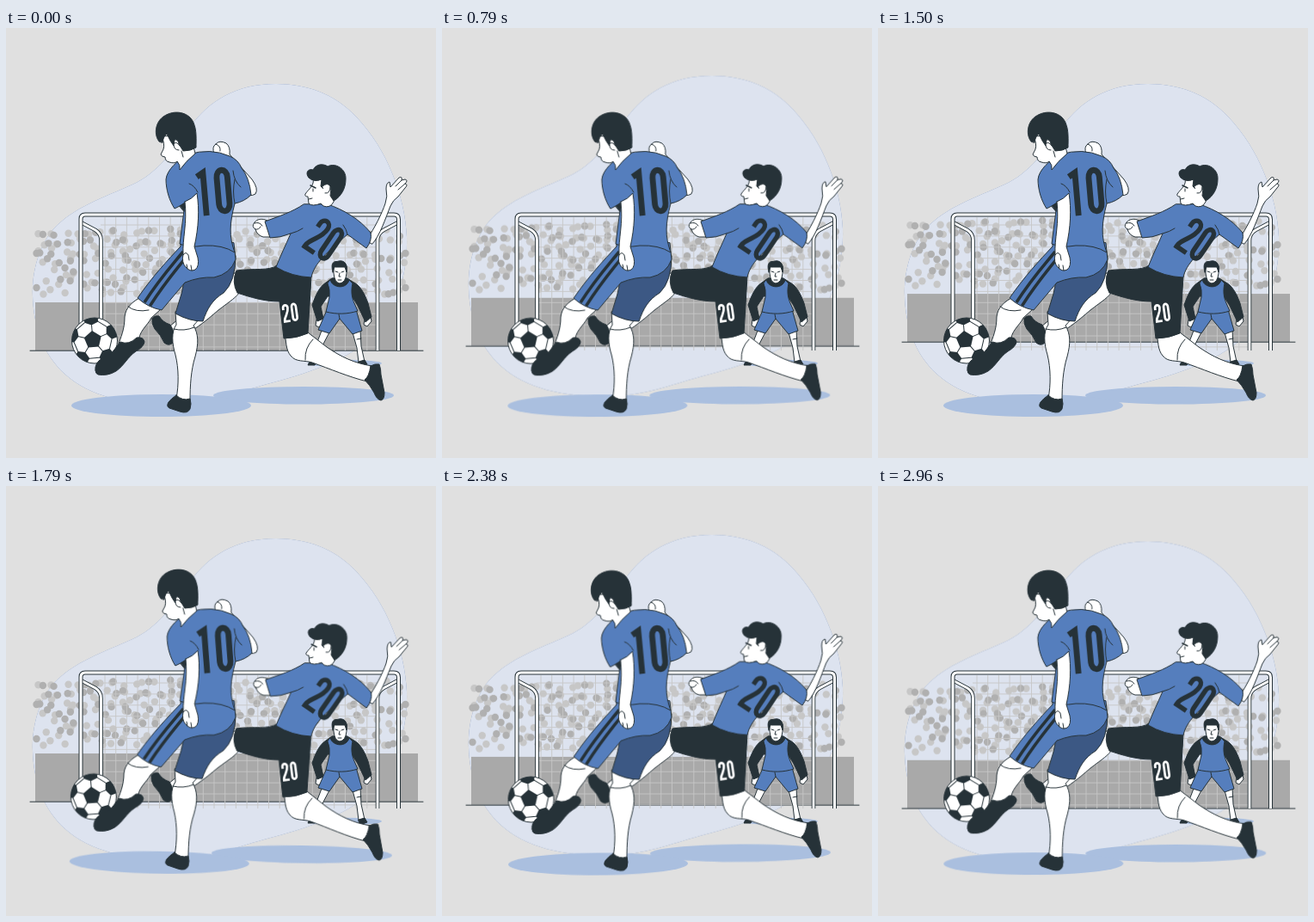
Recreate the animation shown at these times as an HTML page. Size 500 px wide and 500 px high, loop 3 s.

```html
<!DOCTYPE html>
<html lang="en">
<head>
<meta charset="utf-8">
<title>Football match</title>
<style>
  html, body { margin: 0; height: 100%; overflow: hidden; background: #e0e0e0; }
  svg { display: block; width: 100vw; height: 100vh; }

  .blob { animation: float 1.5s linear infinite; }
  .stand { animation: float 3s linear infinite; }
  .players { transform-origin: 271px 275px; animation: sway 1.5s linear infinite; }
  @keyframes float { 50% { transform: translateY(-10px); } }
  @keyframes sway {
    25% { transform: rotate(1deg); }
    75% { transform: rotate(-1deg); }
  }

  .ink { stroke: #263238; stroke-width: 1; stroke-linejoin: round; stroke-linecap: round; }
  .skin { fill: #fff; }
  .kit { fill: #557ebd; }
  .shade { fill: #3c5884; }
  .dark { fill: #263238; }
  .line { fill: none; }
  .shadow { fill: #aabfdf; }
  .digit { fill: none; stroke-width: 5.5; }
  .post { fill: none; stroke-linejoin: round; }
</style>
</head>
<body>
<svg viewBox="0 0 500 500">
  <defs>
    <path id="blobShape" d="M314 65C267 65 236 85 214 115C194 143 176 169 147 182C114 197 79 208 55 234C37 255 30 286 31 312C32 345 42 378 68 402C97 429 142 438 190 438C235 437 264 425 300 415C350 402 401 386 432 353C458 323 467 279 466 243C464 195 443 141 408 104C382 76 349 65 314 65Z"/>
    <path id="d0" class="digit" d="M-5-12.500V12.500A5 6.800 0 0 0 5 12.500V-12.500A5 6.800 0 0 0 -5-12.500Z"/>
    <path id="d1" class="digit" d="M-5-15L1-18.500V22"/>
    <path id="d2" class="digit" d="M-5.500-8V-12.500A5.500 6.800 0 0 1 5.500-12.500C5.500-2 0 3-4 12Q-5.500 15-5.500 19.300H8"/>
    <g id="patch">
      <path class="ink line" d="M0-10V-17M8-20.500L17-14"/>
      <path class="dark" d="M0-17L8-20.500V-28H-8V-20.500Z"/>
    </g>
    <path id="postsBack" class="post" d="M87 226L104 235Q110.500 239 110.500 247V375M456 226L439 235Q432 239 432 247V375"/>
    <path id="postsFront" class="post" d="M87 375V222Q87 217 92 217H451Q456.500 217 456.500 222.500V375"/>
    <clipPath id="ballClip"><circle r="26.500"/></clipPath>
  </defs>

  <g class="blob">
    <use href="#blobShape" fill="#5574ae"/>
    <use href="#blobShape" fill="#fff" fill-opacity=".8"/>
  </g>

  <g class="stand">
    <g id="crowd"></g>
    <path fill="#a9a9a9" d="M34 319H479V375H34Z"/>
    <path class="ink" d="M28 375.200H485"/>
  </g>

  <g id="goal">
    <path id="net" fill="none" stroke="#c7c7c7" stroke-width=".9"/>
    <use href="#postsBack" stroke="#263238" stroke-width="4.600"/>
    <use href="#postsBack" stroke="#fff" stroke-width="2.800"/>
    <use href="#postsFront" stroke="#263238" stroke-width="5"/>
    <use href="#postsFront" stroke="#fff" stroke-width="3"/>
  </g>

  <!-- keeper -->
  <ellipse class="shadow" cx="394" cy="390" rx="43" ry="4.300"/>
  <g class="ink">
    <path class="skin" d="M367 352L360 370L356 388L361 389L366 373L376 354ZM403 354L408 372L410 389L417 388L413 370L412 351Z"/>
    <path class="line" d="M360 370L366 371M408 362L413 361"/>
    <path class="dark" d="M356 386L361 388L359 392H351Q352 388 356 386ZM410 388L417 386L420 391Q415 394 411 392Z"/>
    <path class="skin" d="M361 339L360 346L364 348L369 342L368 337ZM417 339L416 345L420 347L425 341L424 336Z"/>
    <path class="dark" d="M379 291L372 296C364 301 360 311 356 322L362 341L369 338L366 324L374 312H402L409 323L418 342L425 336L421 320C417 309 412 299 403 295L397 291Z"/>
    <path class="kit" d="M373 328L363 351L376 355L388 338L403 356L414 352L407 327Z"/>
    <path class="kit" d="M377 293C380 303 396 304 399 293L403 297C401 306 402 313 405 320L409 329C397 333 384 333 372 330L376 313Q377 304 374 297Z"/>
    <path class="skin" d="M382 288V292Q388 300 395 292V288Z"/>
    <path class="skin" d="M381 277V285Q382 296 388 297Q395 296 396 285V277Z"/>
    <path class="dark" d="M380 284C378 276 379 271 385 271.500C392 269 398 273 396 284L394 278H382Z"/>
    <path class="line" d="M383 283L386 284M390 284L393 283M388 285L387 289H389M386 293H390M388 338L387 333"/>
  </g>

  <g class="players">
    <ellipse class="shadow" cx="346" cy="427.300" rx="105" ry="10.300"/>
    <ellipse class="shadow" cx="180.500" cy="439" rx="104.500" ry="13"/>

    <!-- defender -->
    <g class="ink">
      <path class="skin" d="M270 284C252 287 236 306 220 322L189 348L196 361C216 355 233 340 247 328C260 318 270 312 272 306Z"/>
      <path class="dark" d="M170 338Q172 334 178 335Q182 342 191 345Q197 354 195 365Q190 371 184 366Q180 357 173 350Q169 344 170 338Z"/>
      <path class="skin" d="M324 354C326 364 325 374 331 381C337 389 347 386 356 389C376 396 399 406 420 411L426 393C405 390 389 382 373 371L351 354Z"/>
      <path class="line" d="M348 386Q347 372 357 362"/>
      <path class="dark" d="M424 393Q429 390 434 391Q436 396 436 403L440 424Q440 432 436 433Q431 432 428 424Q423 415 417 409Q422 406 424 393Z"/>
      <path class="dark" d="M315 276C306 283 288 279 268 282Q262 295 269 308C284 313 300 318 318 318L323 361Q338 361 351 355L355 289Z"/>

      <path class="skin" d="M304 224C298 221 292 222 289 226Q285 231 290 234Q292 241 299 243L309 243Z"/>
      <path class="line" d="M289 227Q295 225 298 230M290 234Q294 235 296 231"/>
      <path class="skin" d="M419 247C429 232 437 216 441 204Q444 196 442 187Q442 180 446 179L447 185L457 174Q461 172 460 177L464 176Q468 177 464 181Q468 182 464 186L456 196Q450 200 447 207C441 222 435 241 426 251Z"/>
      <path class="line" d="M460 177L453 184M464 181L456 188"/>
      <path class="kit" d="M346 205C333 214 317 219 301 225L307 244Q319 244 331 239C325 253 319 265 314 278Q332 289 355 290C358 274 374 260 397 240L419 256Q426 247 424 238C411 222 392 211 374 205Z"/>
      <path class="line" d="M331 239Q339 237 345 233M397 240Q396 234 392 229"/>
      <path class="skin" d="M357 175C359 183 353 186 348 193Q347 196 351 196L352 204Q356 208 366 204L369 207Q377 210 381 202L387 180Z"/>
      <path class="dark" d="M352 174C347 168 352 163 357 165C361 157 370 158 374 161C383 156 396 164 395 176C395 186 390 196 381 201L377 195Q379 188 376 183Q371 181 369 187L366 184L367 176Q358 180 352 174Z"/>
      <path class="skin" d="M368 184Q374 179 377 184Q377 193 371 192"/>
      <path class="line" stroke-width="1.500" d="M354 183L360 186"/>
      <path class="line" d="M357 187V190M352 199L356 198"/>
    </g>
    <g transform="translate(370 246) rotate(34)" stroke="#263238">
      <use href="#d2" x="-9"/><use href="#d0" x="9.500"/>
    </g>
    <g transform="translate(330.500 331) rotate(-8) scale(.49)" stroke="#fff">
      <use href="#d2" x="-10"/><use href="#d0" x="10"/>
    </g>

    <!-- ball -->
    <g transform="translate(103 363.500)">
      <circle class="skin" r="26.500"/>
      <g clip-path="url(#ballClip)">
        <g id="panels" transform="translate(-2 -1) rotate(-5)">
          <path class="dark" d="M0-10.500L10-3.200L6.200 8.500H-6.200L-10-3.200Z"/>
        </g>
      </g>
      <circle class="ink line" r="26.500"/>
    </g>

    <!-- striker -->
    <g class="ink">
      <path class="skin" d="M242 146Q239 138 244 135Q248 130 256 134Q261 138 260 147L286 176Q294 187 290 193Q284 197 271 192L258 152Z"/>
      <path class="line" d="M244 135Q250 137 249 143"/>
      <path class="skin" d="M197 330L198 345C192 353 193 367 197 380C201 396 201 415 198 431L214 434C214 416 215 398 220 382C224 367 224 356 218 346L226 337Z"/>
      <path class="line" d="M195 350Q207 353 219 348"/>
      <path class="dark" d="M198 427Q192 431 189 435Q186 440 190 442L202 446Q211 449 214 443Q216 437 214 431Q205 434 198 427Z"/>
      <path class="skin" d="M157 313C147 318 139 325 138 336C138 350 134 359 129 372L154 367C154 352 164 347 169 337L180 327Z"/>
      <path class="line" d="M142 324Q151 331 166 328"/>
      <path class="dark" d="M104 398Q103 392 108 387Q114 381 122 379L133 365Q143 369 152 360Q160 359 161 365Q160 371 151 376C141 383 137 393 128 399Q118 405 107 403Q104 402 104 398Z"/>

      <path class="shade" d="M209 285L204 309L197 332Q213 341 229 341C234 326 240 316 253 308Q267 295 267 265Z"/>
      <path class="kit" d="M203 248V254C188 270 171 288 153 314Q165 325 181 328L208 296Q225 289 242 290Q261 286 267 269L265 250Z"/>
      <path class="line" stroke-width="3.600" stroke-linecap="butt" d="M206 260C193 276 179 291 161 319M212 263C200 279 186 294 167.500 323"/>

      <path class="kit" d="M212 147C200 153 187 165 186 176C186 188 190 201 196 210L208 204L202 251Q213 256 230 253Q252 252 266 261C259 242 260 227 266 204Q277 202 285 194Q283 174 274 163Q270 153 260 149Q238 139 212 147Z"/>
      <path class="dark" d="M202 207L208 203L207 213Z"/>
      <path class="line" d="M223 191Q219 183 213 181M266 204Q263 190 266 176M264 166Q265 178 273 185"/>
      <path class="skin" d="M208 202Q216 199 222 192C225 211 224 232 219 254L223 267Q225 277 220 281Q214 284 209 278Q204 273 206 263C205 245 211 227 208 202Z"/>
      <path class="line" d="M206 264Q209 259 212 264L213 270M211 280L210 275M216 282L215 276"/>

      <path class="skin" d="M181 126Q185 135 183 141L180 147Q181 150 185 150Q185 155 190 156Q196 158 199 155Q203 159 202 165Q209 155 220 146L215 126Z"/>
      <path class="dark" d="M178 132C172 125 173 110 183 103C196 94 213 98 218 110C222 119 221 130 221 139Q215 143 206 143L201 135Q200 129 196 130L195 137L191 131L187 123Q183 126 182 133Z"/>
      <path class="skin" d="M202 137Q198 131 195 135Q195 142 201 142"/>
      <path class="line" d="M204 143L206 150"/>
    </g>
    <g transform="translate(242 190) rotate(-5) scale(1.240)" stroke="#263238">
      <use href="#d1" x="-10"/><use href="#d0" x="8.500"/>
    </g>
  </g>
</svg>
<script>
  const NS = 'http://www.w3.org/2000/svg';
  const byId = id => document.getElementById(id);

  function add(parent, tag, attrs) {
    const node = document.createElementNS(NS, tag);
    for (const key in attrs) node.setAttribute(key, attrs[key]);
    parent.append(node);
  }

  let seed = 20;
  const random = () => (seed = seed * 16807 % 2147483647) / 2147483647;

  // Spectators: loose rows of heads, light ones behind dark ones.
  for (const [color, share] of [['#c7c7c7', .85], ['#b0b0b0', .55]]) {
    for (let row = 0; row < 7; row++) {
      for (let col = 0; col < 32; col++) {
        const cx = 42 + col * 13.3 + (row % 2) * 5 + (random() - .5) * 9;
        const cy = 238 + row * 11.3 + (random() - .5) * 9;
        if (random() < share && cx < 467) add(byId('crowd'), 'circle', { cx, cy, r: 4.2, fill: color });
      }
    }
  }
  for (const cx of [35.5, 464.5])
    for (const cy of [262, 302]) add(byId('crowd'), 'circle', { cx, cy, r: 4.2, fill: '#b0b0b0' });

  let net = '';
  for (let x = 115; x < 432; x += 12.7) net += `M${x} 220V375`;
  for (let y = 229; y < 375; y += 12.9) net += `M110 ${y}H432`;
  byId('net').setAttribute('d', net);

  for (let i = 0; i < 5; i++) add(byId('panels'), 'use', { href: '#patch', transform: `rotate(${i * 72})` });
</script>
</body>
</html>
```
